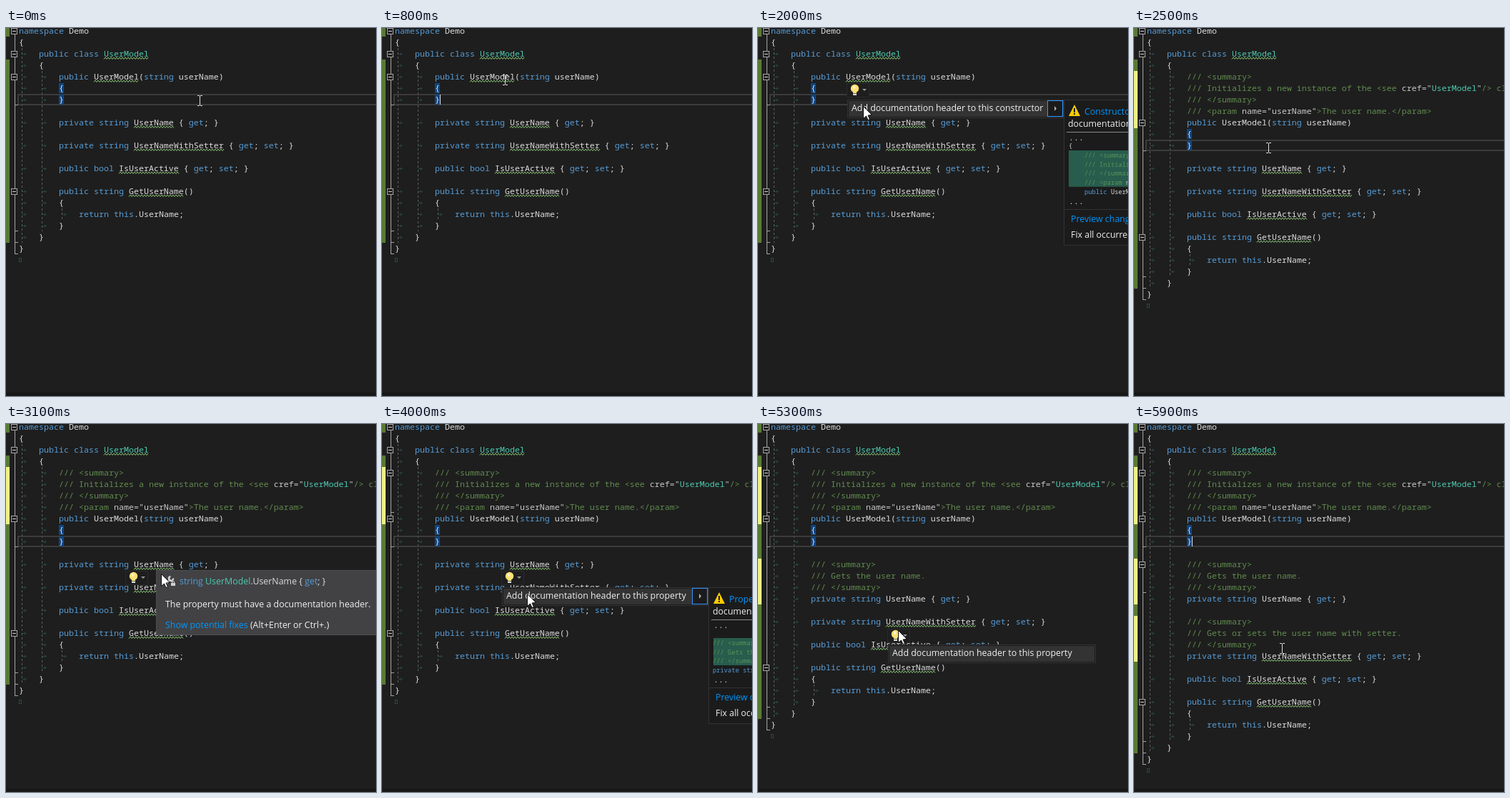
Animation, 518 px wide and 514 px high, one loop 6 s. Source, as an HTML page with a canvas:

```html
<!DOCTYPE html>
<html lang="en">
<head>
<meta charset="utf-8">
<title>Documentation header quick fix</title>
<style>
  html, body { margin: 0; width: 100%; height: 100%; overflow: hidden; background: #1e1e1e; }
  canvas { display: block; }
</style>
</head>
<body>
<canvas id="stage" width="518" height="514"></canvas>
<script>
const ctx = document.getElementById('stage').getContext('2d');
const W = 518, H = 514, LOOP = 6000, STEP = 100;
const ROW = 16, COL = 7, LEFT = 18;
const MONO = '11.667px "Noto Sans Mono", monospace';
const SMALL = '8.8px "Noto Sans Mono", monospace';
const UI = '12.4px "Open Sans", sans-serif';
const C = {
  bg: '#1e1e1e', text: '#dcdcdc', key: '#569cd6', type: '#4ec9b0', doc: '#608b4e',
  link: '#0097fb', white: '#f1f1f1', menu: '#1b1b1c', edge: '#333337', outline: '#a5a5a5'
};

const DOCS = [
  ['/// <summary>',
   '/// Initializes a new instance of the <see cref="UserModel"/> class.',
   '/// </summary>',
   '/// <param name="userName">The user name.</param>'],
  ['/// <summary>', '/// Gets the user name.', '/// </summary>'],
  ['/// <summary>', '/// Gets or sets the user name with setter.', '/// </summary>']
];

const PROPERTY_FIX = 'Add documentation header to this property';
const PROPERTY_RULE = 'The property must have a documentation header.';

// Each quick fix: when its parts appear, and where.
const FIXES = [
  { tip: 1000, menu: 1700, preview: 1800, done: 2200, clean: 2400, fold: 3500,
    x: 124, y: 77, right: 428, top: 100, tipX: 167, tipY: 76, tipW: 330,
    title: [['UserModel', C.type], ['.UserModel(', C.text], ['string', C.key], [' userName)', C.text]],
    rule: 'The constructor must have a documentation header.',
    label: 'Add documentation header to this constructor',
    warning: 'Constructor must', code: 'public UserModel(string userName)', indent: 29 },
  { tip: 2800, menu: 3400, preview: 3500, done: 4300, clean: 4500, fold: 5600,
    x: 167, y: 205, right: 457, top: 228, tipX: 210, tipY: 204, tipW: 316, property: true,
    title: [['string', C.key], [' UserModel', C.type], ['.UserName { ', C.text], ['get', C.key], ['; }', C.text]],
    rule: PROPERTY_RULE, label: PROPERTY_FIX,
    warning: 'Property must', code: 'private string UserName', indent: 6 },
  { tip: 4800, menu: 5200, preview: 5400, done: 5800, clean: LOOP, fold: LOOP,
    x: 181, y: 286, right: 473, top: 308, tipX: 214, tipY: 284, tipW: 340, property: true,
    title: [['string', C.key], [' UserModel', C.type], ['.UserNameWithSetter { ', C.text],
            ['get', C.key], ['; ', C.text], ['set', C.key], ['; }', C.text]],
    rule: PROPERTY_RULE, label: PROPERTY_FIX,
    warning: 'Property must', code: 'private string UserNameWithSetter', indent: 6 }
];

// time, x, y of the pointer
const PATH = [
  [100, 271, 101], [900, 168, 71], [1200, 166, 74], [1400, 154, 84], [1600, 140, 88],
  [2000, 147, 109], [2200, 147, 112], [2700, 211, 197], [2900, 213, 201], [3100, 217, 209],
  [3400, 181, 215], [4000, 203, 237], [4300, 203, 239], [4700, 214, 279], [5000, 208, 284],
  [5300, 196, 288], [5600, 207, 311], [5800, 207, 313]
];

function rect(x, y, w, h, fill, stroke) {
  ctx.fillStyle = fill;
  ctx.fillRect(x, y, w, h);
  if (!stroke) return;
  ctx.strokeStyle = stroke;
  ctx.lineWidth = 1;
  ctx.strokeRect(x + .5, y + .5, w - 1, h - 1);
}

function line(color, width, ...points) {
  ctx.strokeStyle = color;
  ctx.lineWidth = width;
  ctx.beginPath();
  points.forEach(([x, y]) => ctx.lineTo(x, y));
  ctx.stroke();
}

function shape(fill, ...points) {
  ctx.fillStyle = fill;
  ctx.beginPath();
  points.forEach(([x, y]) => ctx.lineTo(x, y));
  ctx.closePath();
  ctx.fill();
}

function runs(parts, x, y, font) {
  ctx.font = font;
  for (const [text, color] of parts) {
    ctx.fillStyle = color;
    ctx.fillText(text, x, y);
    x += ctx.measureText(text).width;
  }
}

const label = (text, x, y, color = C.white, font = UI) => runs([[text, color]], x, y, font);

function colorize(text) {
  if (text.startsWith('///')) {
    return text.split(/(\w+="|"(?=[/>])|UserModel|userName(?="))/).map(part => [part,
      part === 'UserModel' ? C.type : /"|userName/.test(part) ? '#c8c8c8' : C.doc]);
  }
  let afterClass = false;
  return text.split(/(\w+)/).map(part => {
    const keyword = /^(namespace|public|private|class|string|bool|get|set|return|this)$/.test(part);
    const color = keyword ? C.key : afterClass && /\w/.test(part) ? C.type : C.text;
    if (/\w/.test(part)) afterClass = part === 'class';
    return [part, color];
  });
}

function buildLines(t) {
  const lines = [];
  const add = (indent, text, extra) => lines.push({ indent, text, ...extra });
  const member = (index, text, name) => {
    const fix = FIXES[index], done = t >= fix.done;
    if (done) DOCS[index].forEach((doc, i) => add(2, doc, {
      fresh: true, fold: i === 0 && t >= fix.fold, tick: i === DOCS[index].length - 1 && t >= fix.fold
    }));
    add(2, text, { fresh: done, wavy: t < fix.clean && name, fold: index === 0 });
  };
  add(0, 'namespace Demo', { fold: true });
  add(0, '{');
  add(1, 'public class UserModel', { fold: true, wavy: 'UserModel' });
  add(1, '{');
  member(0, 'public UserModel(string userName)', 'UserModel');
  add(2, '{', { match: true });
  add(2, '}', { match: true, current: true, tick: true });
  add(0, '');
  member(1, 'private string UserName { get; }', 'UserName');
  add(0, '');
  member(2, 'private string UserNameWithSetter { get; set; }', 'UserNameWithSetter');
  add(0, '');
  add(2, 'public bool IsUserActive { get; set; }', { wavy: 'IsUserActive' });
  add(0, '');
  add(2, 'public string GetUserName()', { fold: true, wavy: 'GetUserName' });
  add(2, '{');
  add(3, 'return this.UserName;');
  add(2, '}', { tick: true });
  add(1, '}', { tick: true });
  add(0, '}', { tick: true });
  return lines;
}

function squiggle(x, y, width) {
  const points = [];
  for (let dx = 0; dx <= width; dx += 2) points.push([x + dx, y + (dx % 4 ? 0 : 2.5)]);
  line('#8ac878', 1, ...points);
}

function guide(x, from, to) {
  ctx.setLineDash([3, 3]);
  line('#606060', 1, [x + .5, from * ROW - 4], [x + .5, to * ROW - 4]);
  ctx.setLineDash([]);
}

function drawEditor(t) {
  const lines = buildLines(t), count = lines.length;
  rect(0, 0, W, H, C.bg);
  rect(0, 509, W, 5, '#181818');

  guide(22, 2, count - 1);
  guide(50, 4, count - 2);
  guide(78, count - 4, count - 3);
  line(C.outline, 1, [12.5, 4], [12.5, count * ROW - 4.5], [17, count * ROW - 4.5]);

  lines.forEach((item, i) => {
    const y = i * ROW + 4, x = LEFT + item.indent * 4 * COL;
    if (i === 0 || (i > 2 && i < count - 1)) rect(0, y - 8, 5, ROW, item.fresh ? '#eff284' : '#587a35');
    if (item.current) {
      ctx.strokeStyle = '#464646';
      ctx.lineWidth = 1.5;
      ctx.strokeRect(17, y - 7, W + 4, 14);
    }
    if (item.match) rect(x, y - 7, COL, 14, '#0e4583');
    if (item.tick) line(C.outline, 1, [12.5, y + 7.5], [17, y + 7.5]);
    if (item.fold) {
      rect(7, y - 4, 9, 9, C.bg, C.outline);
      line('#d0d0d0', 1, [9, y + .5], [14, y + .5]);
    }
    for (let tab = 0; tab < item.indent; tab++) {
      const ax = LEFT + tab * 28 + 5;
      line('#28494d', 1, [ax, y + .5], [ax + 5, y + .5]);
      line('#28494d', 1, [ax + 3, y - 1.5], [ax + 5, y + .5], [ax + 3, y + 2.5]);
    }
    runs(colorize(item.text), x, y + 4, MONO);
    if (item.wavy) {
      squiggle(x + item.text.indexOf(item.wavy) * COL, y + 5, item.wavy.length * COL);
    }
    const popup = FIXES.some(fix => t >= fix.menu && t < fix.done);
    if (item.current && !popup && (t + 90) % 1060 >= 530) rect(x + COL, y - 7, 1, 14, C.text);
  });
  rect(LEFT, count * ROW + 1, 4, 6, C.bg, '#28494d');
}

function drawBulb(x, y) {
  rect(x, y, 32, 20, C.bg, '#29292b');
  ctx.fillStyle = '#ffdf75';
  ctx.beginPath();
  ctx.arc(x + 11.5, y + 7.5, 5.7, 0, Math.PI * 2);
  ctx.fill();
  rect(x + 9, y + 11, 5, 3, '#ffdf75');
  rect(x + 9, y + 14, 5, 1, '#6b6b6b');
  rect(x + 9, y + 15, 5, 2, '#d8d8d8');
  ctx.fillStyle = '#fff4c8';
  ctx.fillRect(x + 9, y + 4, 3, 4);
  shape('#999999', [x + 22, y + 8], [x + 28, y + 8], [x + 25, y + 11]);
}

function drawTipIcon(x, y, property) {
  if (property) {
    line('#d0d0d0', 2.5, [x, y + 5], [x + 7, y - 2]);
    ctx.beginPath();
    ctx.arc(x + 8, y - 3, 3, -.2, 4.5);
    ctx.stroke();
    rect(x + 8, y + 3, 6, 4, '#d0d0d0');
    line('#d0d0d0', 1, [x + 9.5, y + 3], [x + 9.5, y + 1], [x + 12.5, y + 1], [x + 12.5, y + 3]);
    return;
  }
  const cx = x + 5, s = 4.5;
  line('#c8c8c8', 1.2, [cx, y - 5], [cx + s, y - 2.5], [cx + s, y + 2.5], [cx, y + 5],
    [cx - s, y + 2.5], [cx - s, y - 2.5], [cx, y - 5]);
  line('#c8c8c8', 1.2, [cx - s, y - 2.5], [cx, y], [cx + s, y - 2.5]);
  line('#c8c8c8', 1.2, [cx, y], [cx, y + 5]);
}

function drawTip(fix) {
  const { tipX: x, tipY: y } = fix;
  rect(x, y, fix.tipW, 91, '#424245', '#505053');
  drawTipIcon(x + 13, y + 15, fix.property);
  runs(fix.title, x + 33, y + 20, UI);
  label(fix.rule, x + 13, y + 52);
  runs([['Show potential fixes', C.link], [' (Alt+Enter or Ctrl+.)', C.white]], x + 13, y + 81, UI);
}

function drawMenu(fix, open) {
  const x = fix.x + 1, y = fix.top, w = fix.right - x;
  rect(x, y, w, 26, C.menu, C.edge);
  rect(x + 2, y + 2, w - 4, 22, '#333334');
  label(fix.label, x + 6, y + 16);
  if (!open) return;
  const bx = fix.right - 23;
  rect(bx, y + 1, 22, 23, C.menu, '#3399ff');
  shape('#b0b0b0', [bx + 10, y + 9], [bx + 13, y + 12.5], [bx + 10, y + 16]);
}

function drawPreview(fix, docs) {
  const x = fix.right, y = fix.top, end = y + 71 + 12.7 * docs.length;
  rect(x, y, W, end + 82 - y, C.menu, C.edge);
  shape('#ffcc00', [x + 15, y + 7], [x + 23, y + 23], [x + 7, y + 23]);
  rect(x + 14, y + 12, 2, 6, '#1b1b1c');
  rect(x + 14, y + 19, 2, 2, '#1b1b1c');
  label(fix.warning, x + 29, y + 21, C.link);
  label('documentation header.', x + 6, y + 38);
  rect(x + 4, y + 45, W, 1, '#8a8a8a');
  label('...', x + 7, y + 57, C.text, MONO);
  if (!fix.property) label('{', x + 7, y + 68, C.text, SMALL);
  rect(x + 7, y + 71, W, end - y - 71, '#285c4c');
  docs.forEach((doc, i) => {
    const parts = colorize(doc).map(([s, c]) => [s, c === C.doc ? '#57945a' : c]);
    runs(parts, x + fix.indent, y + 81 + i * 12.5, SMALL);
  });
  runs(colorize(fix.code), x + fix.indent, end + 10, SMALL);
  label('...', x + 7, end + 24, C.text, MONO);
  rect(x + 1, Math.round(end + 31), W, 1, C.edge);
  label('Preview changes', x + 10, end + 49, C.link);
  label('Fix all occurrences in:', x + 10, end + 71);
}

function pointerAt(t) {
  const next = PATH.findIndex(p => p[0] > t);
  if (next === 0) return PATH[0].slice(1);
  if (next < 0) return PATH[PATH.length - 1].slice(1);
  const [t0, x0, y0] = PATH[next - 1], [t1, x1, y1] = PATH[next];
  const p = (t - t0) / (t1 - t0), ease = p * p * (3 - 2 * p);
  return [x0 + (x1 - x0) * ease, y0 + (y1 - y0) * ease].map(Math.round);
}

function drawPointer(t) {
  const [x, y] = pointerAt(t);
  if (FIXES.some(fix => t >= fix.tip + 200 && t < fix.done)) {
    const arrow = [[0, 0], [0, 17], [4, 13.5], [6.5, 19], [9, 18], [6.5, 12.5], [12, 12]]
      .map(([dx, dy]) => [x + dx + .5, y + dy + .5]);
    shape('#ffffff', ...arrow);
    line('#101010', 1, ...arrow, arrow[0]);
    return;
  }
  line('#e0e0e0', 1, [x + .5, y - 6], [x + .5, y + 7]);
  for (const dy of [-6.5, 7.5]) line('#e0e0e0', 1, [x - 3, y + dy], [x, y + dy]);
  for (const dy of [-6.5, 7.5]) line('#e0e0e0', 1, [x + 1, y + dy], [x + 4, y + dy]);
}

function draw(t) {
  drawEditor(t);
  FIXES.forEach((fix, i) => {
    if (t < fix.tip || t >= fix.done) return;
    drawBulb(fix.x, fix.y);
    if (t < fix.menu) drawTip(fix);
    else drawMenu(fix, t >= fix.preview);
    if (t >= fix.preview) drawPreview(fix, DOCS[i]);
  });
  drawPointer(t);
}

function tick() {
  const t = Math.floor(performance.now() % LOOP / STEP) * STEP;
  draw(t);
  requestAnimationFrame(tick);
}
tick();
</script>
</body>
</html>
```
